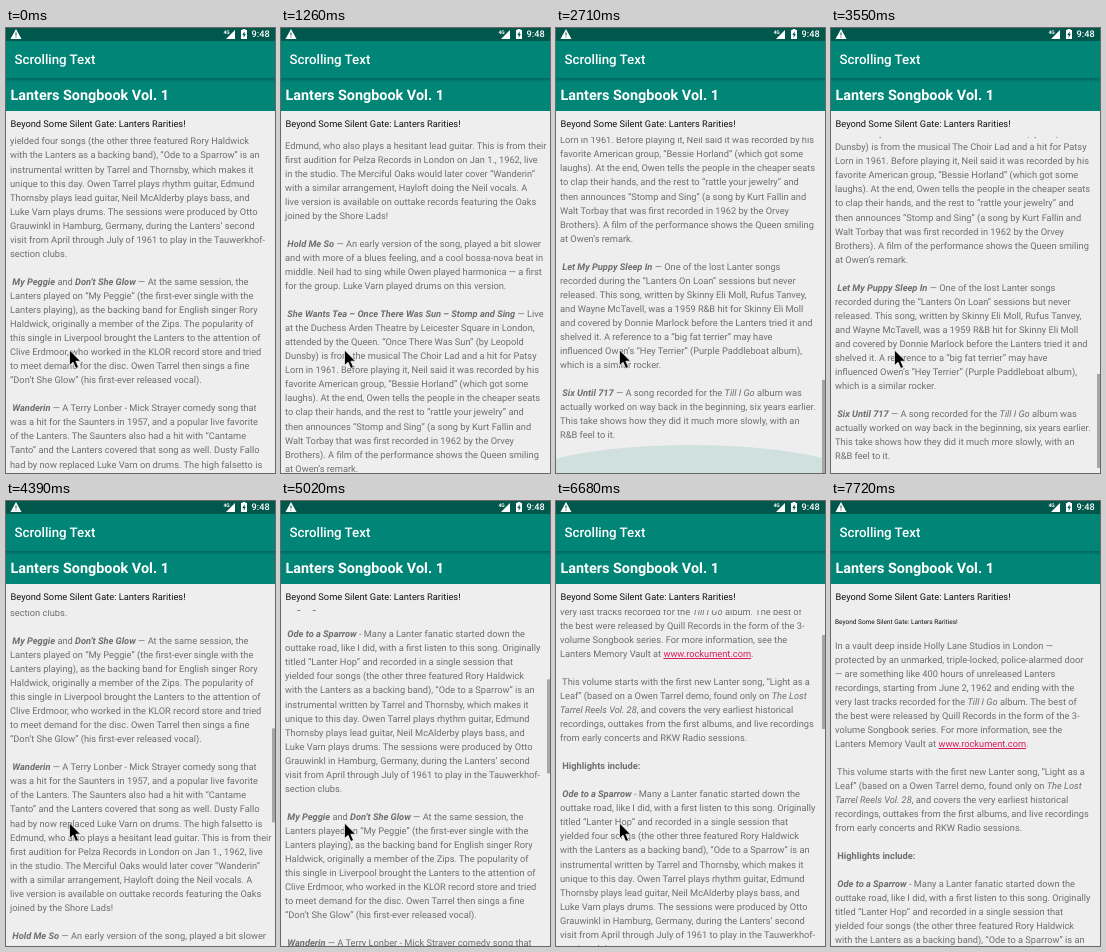
Write an HTML page that moves like this. It is 269 by 445 pixels and loops after 7930 ms.

```html
<!DOCTYPE html>
<html lang="en">
<head>
<meta charset="utf-8">
<title>Scrolling Text</title>
<style>
html, body { margin: 0; width: 100%; height: 100%; overflow: hidden; }
body { background: #eee; }
#stage {
  --scroll: 312.5; --bar: 0; --top: 0; --end: 0; --pointer: 1;
  position: relative; width: 269px; height: 445px; overflow: hidden;
  background: #eee; color: #111;
  font: 9.28px/14px Roboto, sans-serif;
  text-rendering: geometricPrecision;
  white-space: pre;
  animation: session 7930ms step-end infinite;
}
#stage > * { position: absolute; }
.status { left: 0; top: 0; width: 269px; height: 13px; background: #00574b; }
.clock { left: 245.5px; top: -.5px; color: #fff; font-weight: 500; font-size: 9.2px; }
.appbar { left: 0; top: 13px; width: 260.5px; height: 37px; padding-left: 8.5px; background: #008577; color: #fff; font-weight: 500; font-size: 13.3px; line-height: 39px; }
.heading { left: 0; top: 50px; width: 264.5px; height: 33px; padding-left: 4.5px; background: linear-gradient(#00665b, #008577 4px); color: #fff; font-weight: 700; font-size: 14.4px; line-height: 35px; }
.subtitle { left: 4.5px; top: 90px; }
.view { left: 0; top: 109px; width: 269px; height: 336px; overflow: hidden; }
.doc { position: absolute; left: 4px; top: 4.5px; transform: translateY(calc(var(--scroll) * -1px)); }
.small { font-size: 6.5px; height: 25px; }
pre { margin: 0; font: inherit; line-height: 14.05px; color: #6e6e6e; }
b { font-style: italic; }
u { color: #d81b60; }
.bar { position: absolute; right: 0; top: 0; width: 3px; height: 94px; background: #a6a6a6; opacity: var(--bar); transform: translateY(calc(var(--scroll) * .2775px)); }
.glow { position: absolute; left: -35px; width: 339px; height: 70px; border-radius: 50%; background: #008577; }
.glow.top { top: -42px; opacity: var(--top); }
.glow.end { bottom: -42px; opacity: var(--end); }
.pointer { left: 62px; top: 321px; opacity: var(--pointer); }

@keyframes session {
  0% { --scroll: 312.5; --bar: 0; --top: 0; --end: 0; --pointer: 1; }
  5.29% { --scroll: 560; --bar: 1; }
  7.94% { --scroll: 645; }
  13.24% { --bar: .5; }
  15.88% { --bar: 0; }
  21.05% { --scroll: 695; --bar: 1; }
  23.7% { --scroll: 772; }
  26.35% { --scroll: 814; }
  28.87% { --scroll: 850; }
  31.52% { --scroll: 875; --end: .2; }
  34.17% { --end: .13; }
  36.82% { --end: .18; }
  39.47% { --end: .08; }
  42.11% { --scroll: 871; --end: 0; }
  44.76% { --scroll: 854; }
  47.41% { --scroll: 775; }
  50.06% { --scroll: 655; }
  52.71% { --scroll: 530; }
  55.35% { --scroll: 426.5; }
  58% { --scroll: 365; }
  60.65% { --scroll: 320; }
  63.3% { --scroll: 250; }
  65.95% { --scroll: 175; }
  68.59% { --scroll: 141.5; }
  73.77% { --bar: .5; }
  76.41% { --bar: 0; }
  84.23% { --scroll: 90; --bar: 1; }
  86.88% { --scroll: 22; }
  89.53% { --scroll: 0; --top: .18; }
  92.18% { --top: .08; }
  94.82% { --bar: .5; --top: 0; }
  97.35%, 100% { --scroll: 0; --bar: 0; --top: 0; --end: 0; --pointer: 0; }
}
</style>
</head>
<body>
<div id="stage">
<div class="status"></div>
<svg width="269" height="13" style="left:0;top:0" fill="#fff">
  <path d="M10 1 15.5 11h-11z"/>
  <path d="M9.5 4.5h1v3h-1zM9.5 8.5h1v1h-1z" fill="#00574b"/>
  <text x="217.5" y="5.5" font-size="5" font-weight="700">4G</text>
  <path d="M229 2v9h-9z"/>
  <path d="M236.5 1h3v1h1.5v9h-6V2h1.5z"/>
  <path d="M238.6 3.2 236.4 7h1.3v2.8L239.8 6h-1.2z" fill="#00574b"/>
</svg>
<div class="clock">9:48</div>
<div class="appbar">Scrolling Text</div>
<div class="heading">Lanters Songbook Vol. 1</div>
<div class="subtitle">Beyond Some Silent Gate: Lanters Rarities!</div>
<div class="view"><div class="doc"><div class="small">Beyond Some Silent Gate: Lanters Rarities!</div><pre>
In a vault deep inside Holly Lane Studios in London —
protected by an unmarked, triple-locked, police-alarmed door
— are something like 400 hours of unreleased Lanters
recordings, starting from June 2, 1962 and ending with the
very last tracks recorded for the <i>Till I Go</i> album. The best of
the best were released by Quill Records in the form of the 3-
volume Songbook series. For more information, see the
Lanters Memory Vault at <u>www.rockument.com</u>.

 This volume starts with the first new Lanter song, “Light as a
Leaf” (based on a Owen Tarrel demo, found only on <i>The Lost</i>
<i>Tarrel Reels Vol. 28</i>, and covers the very earliest historical
recordings, outtakes from the first albums, and live recordings
from early concerts and RKW Radio sessions.

 <strong>Highlights include:</strong>

 <b>Ode to a Sparrow</b> - Many a Lanter fanatic started down the
outtake road, like I did, with a first listen to this song. Originally
titled “Lanter Hop” and recorded in a single session that
yielded four songs (the other three featured Rory Haldwick
with the Lanters as a backing band), “Ode to a Sparrow” is an
instrumental written by Tarrel and Thornsby, which makes it
unique to this day. Owen Tarrel plays rhythm guitar, Edmund
Thornsby plays lead guitar, Neil McAlderby plays bass, and
Luke Varn plays drums. The sessions were produced by Otto
Grauwinkl in Hamburg, Germany, during the Lanters’ second
visit from April through July of 1961 to play in the Tauwerkhof-
section clubs.

 <b>My Peggie</b> and <b>Don’t She Glow</b> — At the same session, the
Lanters played on “My Peggie” (the first-ever single with the
Lanters playing), as the backing band for English singer Rory
Haldwick, originally a member of the Zips. The popularity of
this single in Liverpool brought the Lanters to the attention of
Clive Erdmoor, who worked in the KLOR record store and tried
to meet demand for the disc. Owen Tarrel then sings a fine
“Don’t She Glow” (his first-ever released vocal).

 <b>Wanderin</b> — A Terry Lonber - Mick Strayer comedy song that
was a hit for the Saunters in 1957, and a popular live favorite
of the Lanters. The Saunters also had a hit with “Cantame
Tanto” and the Lanters covered that song as well. Dusty Fallo
had by now replaced Luke Varn on drums. The high falsetto is
Edmund, who also plays a hesitant lead guitar. This is from their
first audition for Pelza Records in London on Jan 1., 1962, live
in the studio. The Merciful Oaks would later cover “Wanderin”
with a similar arrangement, Hayloft doing the Neil vocals. A
live version is available on outtake records featuring the Oaks
joined by the Shore Lads!

 <b>Hold Me So</b> — An early version of the song, played a bit slower
and with more of a blues feeling, and a cool bossa-nova beat in
middle. Neil had to sing while Owen played harmonica — a first
for the group. Luke Varn played drums on this version.

 <b>She Wants Tea – Once There Was Sun – Stomp and Sing</b> — Live
at the Duchess Arden Theatre by Leicester Square in London,
attended by the Queen. “Once There Was Sun” (by Leopold
Dunsby) is from the musical The Choir Lad and a hit for Patsy
Lorn in 1961. Before playing it, Neil said it was recorded by his
favorite American group, “Bessie Horland” (which got some
laughs). At the end, Owen tells the people in the cheaper seats
to clap their hands, and the rest to “rattle your jewelry” and
then announces “Stomp and Sing” (a song by Kurt Fallin and
Walt Torbay that was first recorded in 1962 by the Orvey
Brothers). A film of the performance shows the Queen smiling
at Owen’s remark.

 <b>Let My Puppy Sleep In</b> — One of the lost Lanter songs
recorded during the “Lanters On Loan” sessions but never
released. This song, written by Skinny Eli Moll, Rufus Tanvey,
and Wayne McTavell, was a 1959 R&amp;B hit for Skinny Eli Moll
and covered by Donnie Marlock before the Lanters tried it and
shelved it. A reference to a “big fat terrier” may have
influenced Owen’s “Hey Terrier” (Purple Paddleboat album),
which is a similar rocker.

 <b>Six Until 717</b> — A song recorded for the <i>Till I Go</i> album was
actually worked on way back in the beginning, six years earlier.
This take shows how they did it much more slowly, with an
R&amp;B feel to it.</pre></div><div class="glow top"></div><div class="glow end"></div><div class="bar"></div></div>
<svg class="pointer" width="15" height="22"><path d="M1.5 1v15.5l3.6-3.3 2.7 6.2 2.7-1.2-2.7-6h4.8z" stroke="#fff" stroke-width=".7"/></svg>
</div>
</body>
</html>
```
